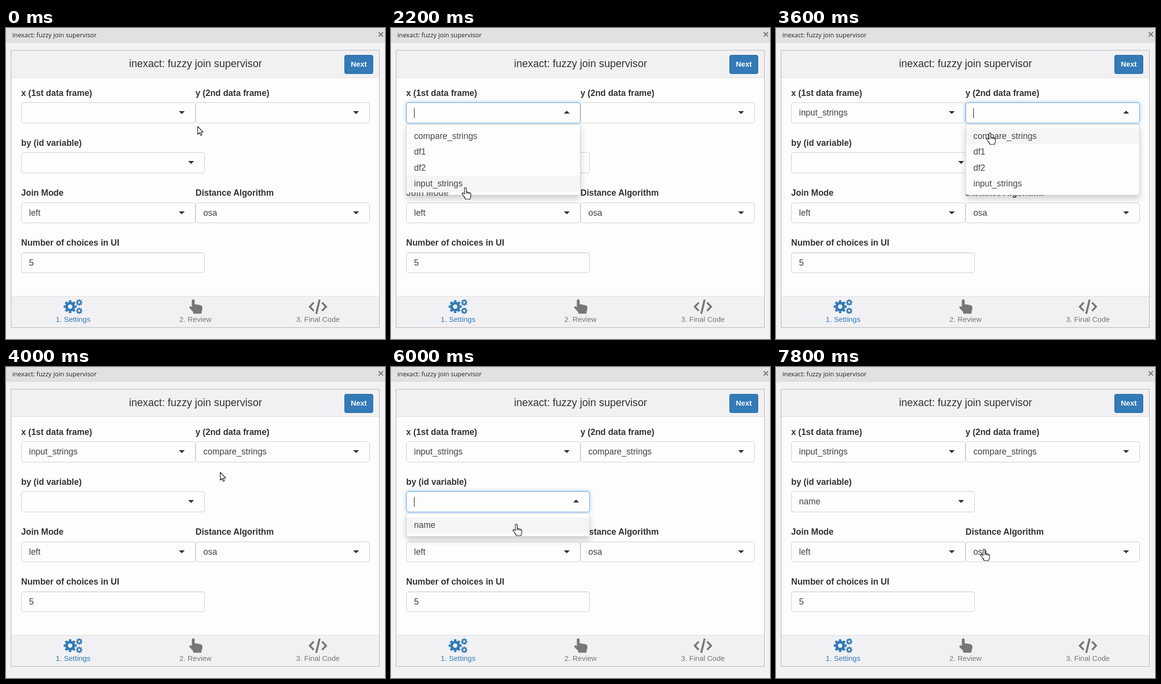
These frames come from a looping animation (774 by 636 pixels, 8 s). An HTML page:

```html
<!DOCTYPE html>
<html lang="en">
<head>
<meta charset="utf-8">
<title>inexact: fuzzy join supervisor</title>
<style>
html, body { margin: 0; width: 100%; height: 100%; overflow: hidden; }
body { position: relative; background: #f2f2f5; color: #333; font: 17.5px/20px "Liberation Sans", Arial, sans-serif; }
body *, .box::after { box-sizing: border-box; }
div, svg { position: absolute; white-space: nowrap; }

.bar { left: 0; top: 0; width: 774px; height: 30px; background: #e1e1e3; border-bottom: 1px solid #d6d6d8; }
.bar div { left: 13px; top: 5px; font: 12.85px/18px "Open Sans", "Noto Sans", sans-serif; color: #222; }
.panel { left: 10px; top: 45px; width: 753px; height: 568px; border: 1px solid #b3b3b5; background: #fdfdfc; }
.head, .foot { left: 0; width: 751px; background: #f1f1f4; }
.head { top: 0; height: 56px; border-bottom: 1px solid #dcdcde; }
.foot { top: 502px; height: 64px; border-top: 1px solid #dcdcde; }
.title { left: 0; width: 774px; top: 61px; text-align: center; font-size: 21.25px; line-height: 24px; }
.next { left: 691px; top: 55px; width: 59px; height: 39px; border: 1px solid #2e6da4; border-radius: 4px; background: #337ab7; color: #fff; font: bold 15px/17px "Liberation Sans", Arial, sans-serif; text-align: center; padding-top: 9px; }
.tab { top: 587px; width: 120px; text-align: center; font-size: 15px; line-height: 17px; color: #777; }
.tab.on { color: #337ab7; }
.label { font-weight: bold; }

.box { height: 43px; border: 1px solid #ccc; border-radius: 5px; background: #fdfdfc; line-height: 40px; padding-left: 15px; color: #444; }
.low { height: 42px; }
.input { box-shadow: inset 0 1px 1px rgba(0,0,0,.075); }
.select::after { content: ""; position: absolute; right: 21px; top: 17px; border: 6.5px solid transparent; border-top-color: #333; border-bottom: 0; }
.focus { border-color: #66a9e0; box-shadow: inset 0 1px 1px rgba(0,0,0,.075), 0 0 8px rgba(102,175,233,.6); }
.focus::after { top: 16px; border: 6.5px solid transparent; border-bottom-color: #333; border-top: 0; }
.c1 { left: 31px; width: 356px; }
.c2 { left: 387px; width: 356px; }
.wide { left: 31px; width: 375px; }
.r1 { top: 152px; } .r2 { top: 254px; } .r3 { top: 357px; } .r4 { top: 459px; }

.menu { background: #fdfdfc; border: 1px solid #d3d3d4; border-radius: 0 0 5px 5px; box-shadow: 0 7px 13px rgba(0,0,0,.19); padding: 7px 0 6px; color: #484848; }
.menu p { position: relative; margin: 0; height: 32.3px; padding: 6px 15px; }
.hover { left: 0; right: 0; top: 7px; height: 32.5px; background: #f5f5f5; }
.caret { width: 1px; height: 20px; background: #111; }
.sliver { left: 31px; top: 327px; color: #777; clip-path: inset(9px 0 2px); }

.anim { animation: 8s step-end infinite; }
.x-open { animation-name: x-open; } .x-caret { animation-name: x-caret; } .x-set { animation-name: x-set; }
.y-open { animation-name: y-open; } .y-caret { animation-name: y-caret; } .y-set { animation-name: y-set; }
.by-open { animation-name: by-open; } .by-caret { animation-name: by-caret; } .by-set { animation-name: by-set; }
.x-hover { animation-name: x-hover; }
.cursor { left: 0; top: 0; overflow: visible; animation-name: cursor; }
.cursor path { stroke-linejoin: round; }
.hand { animation-name: hand; } .arrow { animation-name: arrow; }

@keyframes x-open { 0%, 30%, to { opacity: 0 } 17.5% { opacity: 1 } }
@keyframes x-caret { 0%, 22.5%, 30%, to { opacity: 0 } 15%, 27.5% { opacity: 1 } }
@keyframes x-set { 0% { opacity: 0 } 30%, to { opacity: 1 } }
@keyframes y-open { 0%, 47.5%, to { opacity: 0 } 42.5% { opacity: 1 } }
@keyframes y-caret { 0%, 47.5%, to { opacity: 0 } 40% { opacity: 1 } }
@keyframes y-set { 0% { opacity: 0 } 47.5%, to { opacity: 1 } }
@keyframes by-open { 0%, 77.5%, to { opacity: 0 } 62.5% { opacity: 1 } }
@keyframes by-caret { 0%, 70%, 77.5%, to { opacity: 0 } 62.5%, 75% { opacity: 1 } }
@keyframes by-set { 0% { opacity: 0 } 77.5%, to { opacity: 1 } }
@keyframes x-hover { 0% { transform: none } 22.5% { transform: translateY(32.3px) } 25%, to { transform: translateY(96.9px) } }

@keyframes hand {
  0%, 30%, 35%, 47.5%, 77.5% { opacity: 0 }
  5%, 37.5%, 57.5%, 90%, to { opacity: 1 }
}
@keyframes arrow {
  0%, 30%, 35%, 47.5%, 77.5% { opacity: 1 }
  5%, 37.5%, 57.5%, 90%, to { opacity: 0 }
}
@keyframes cursor {
  0% { transform: translate(391px, 201px) }
  2.5% { transform: translate(389px, 198px) }
  5% { transform: translate(382px, 191px) }
  7.5% { transform: translate(371px, 185px) }
  10% { transform: translate(363px, 182px) }
  12.5%, 15%, 17.5% { transform: translate(359px, 181px) }
  20% { transform: translate(308px, 212px) }
  22.5% { transform: translate(230px, 256px) }
  25% { transform: translate(172px, 307px) }
  27.5%, 30% { transform: translate(152px, 327px) }
  32.5% { transform: translate(168px, 316px) }
  35% { transform: translate(318px, 240px) }
  37.5%, 40% { transform: translate(456px, 167px) }
  42.5% { transform: translate(450px, 188px) }
  45%, 50% { transform: translate(437px, 215px) }
  52.5% { transform: translate(435px, 218px) }
  55% { transform: translate(420px, 237px) }
  57.5% { transform: translate(392px, 264px) }
  60%, 62.5% { transform: translate(375px, 278px) }
  65% { transform: translate(362px, 285px) }
  67.5% { transform: translate(326px, 300px) }
  70% { transform: translate(285px, 314px) }
  72.5%, 75%, 80% { transform: translate(256px, 322px) }
  82.5% { transform: translate(262px, 324px) }
  85% { transform: translate(285px, 333px) }
  87.5% { transform: translate(325px, 347px) }
  90% { transform: translate(365px, 360px) }
  92.5% { transform: translate(393px, 366px) }
  95% { transform: translate(405px, 369px) }
  97.5%, to { transform: translate(425px, 373px) }
}
</style>
</head>
<body>
<div class="bar"><div>inexact: fuzzy join supervisor</div></div>
<div class="panel"><div class="head"></div><div class="foot"></div></div>
<div class="title">inexact: fuzzy join supervisor</div>
<div class="next">Next</div>

<div class="label" style="left:31px;top:123px">x (1st data frame)</div>
<div class="label" style="left:387px;top:123px">y (2nd data frame)</div>
<div class="label" style="left:31px;top:225px">by (id variable)</div>
<div class="label" style="left:31px;top:327px">Join Mode</div>
<div class="label" style="left:387px;top:327px">Distance Algorithm</div>
<div class="label" style="left:31px;top:429px">Number of choices in UI</div>

<div class="box select c1 r1"><span class="anim x-set">input_strings</span></div>
<div class="box select focus c1 r1 anim x-open"></div>
<div class="box select c2 r1"><span class="anim y-set">compare_strings</span></div>
<div class="box select focus c2 r1 anim y-open"></div>
<div class="box select wide r2"><span class="anim by-set">name</span></div>
<div class="box select focus wide r2 anim by-open"></div>
<div class="box select low c1 r3">left</div>
<div class="box select low c2 r3">osa</div>
<div class="box input low wide r4">5</div>

<div class="caret anim x-caret" style="left:47px;top:164px"></div>
<div class="caret anim y-caret" style="left:403px;top:164px"></div>
<div class="caret anim by-caret" style="left:47px;top:266px"></div>

<svg width="774" height="636" fill="none">
  <path d="M761 8.5l9 9m0-9l-9 9" stroke="#777" stroke-width="2.2"/>
  <g stroke="#337ab7">
    <circle cx="131" cy="569.8" r="7.3" stroke-width="5.6"/>
    <circle cx="131" cy="569.8" r="11.4" stroke-width="3.6" pathLength="16" stroke-dasharray="1.1 .9" stroke-dashoffset=".55"/>
    <g id="cog">
      <circle cx="149.5" cy="561.3" r="3.7" stroke-width="2.8"/>
      <circle cx="149.5" cy="561.3" r="5.6" stroke-width="2" pathLength="16" stroke-dasharray="1.1 .9" stroke-dashoffset=".55"/>
    </g>
    <use href="#cog" y="17"/>
  </g>
  <path fill="#777" d="M379.5 558a2.9 2.9 0 0 1 5.8 0v7.5q2-1.5 4 .5q2.5-1.5 4.5.7q2.6-1 4 1q3.2 0 3.2 3.5v3q0 2-1.5 5v2.5q0 2.5-2 2.5h-13.5q-2 0-2-2.5v-1.5l-6-6q-2.5-2.5-1-4.5q1.8-1.8 4.5 1z"/>
  <path stroke="#777" stroke-width="4" d="M628.5 561.5l-8 8.5 8 8.5M645.5 561.5l8 8.5-8 8.5M640.5 555.5l-7 29"/>
</svg>
<div class="tab on" style="left:77px">1. Settings</div>
<div class="tab" style="left:327px">2. Review</div>
<div class="tab" style="left:577px">3. Final Code</div>

<div class="menu c1 anim x-open" style="top:197px;height:145px">
  <div class="hover anim x-hover"></div>
  <p>compare_strings</p><p>df1</p><p>df2</p><p>input_strings</p>
</div>
<div class="label sliver anim x-open">Join Mode</div>
<div class="menu c2 anim y-open" style="top:197px;height:145px">
  <div class="hover"></div>
  <p>compare_strings</p><p>df1</p><p>df2</p><p>input_strings</p>
</div>
<div class="menu wide anim by-open" style="top:299px;height:48px">
  <div class="hover"></div>
  <p>name</p>
</div>

<svg class="cursor anim" width="1" height="1" fill="#fff" stroke="#111" stroke-width="1.2">
  <path class="arrow anim" d="M.5.5V16.5l3.7-3.5 2.5 5.8 2.5-1.1-2.5-5.7h5z"/>
  <path class="hand anim" d="M-2 1.5a1.9 1.9 0 0 1 3.8 0V9q2-1.3 3.3.6 2-1 3.2.6 2.7-.5 2.7 2.2v4q0 3-1.5 5v1.6H-.5v-1.5q-1-2.5-3.2-5l-2.6-3.3q-1.2-2 .4-2.8 1.6-.5 3.9 2.2zM1.8 9v3M5.1 9.6v2.8M8.3 10.2v2.6"/>
</svg>
</body>
</html>
```
